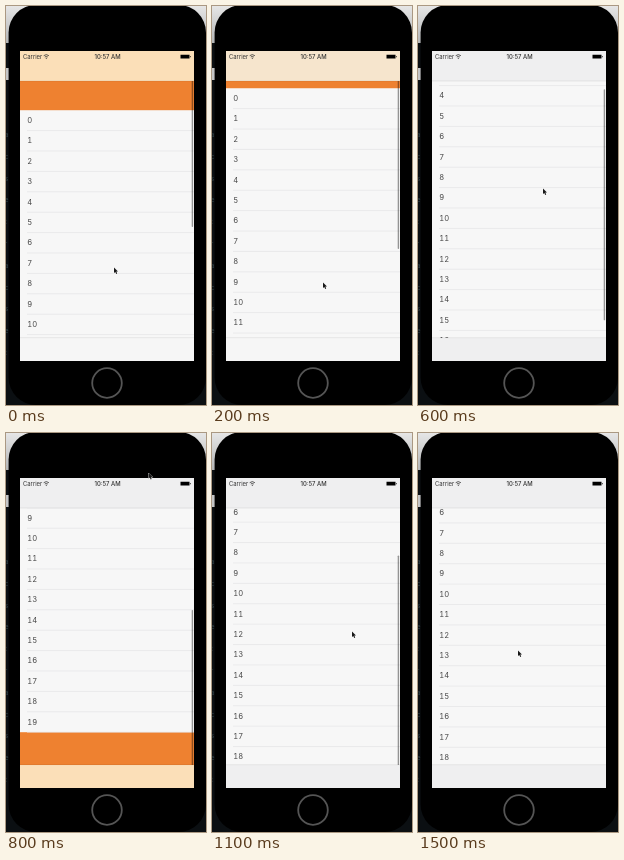
These frames come from a looping animation (200 px wide and 399 px high, 1.9 s). An HTML page:

```html
<!DOCTYPE html>
<html lang="en">
<head>
<meta charset="utf-8">
<style>
html, body { margin: 0; width: 100%; height: 100%; overflow: hidden; background: #0b0f12; }
svg { display: block; width: 200px; height: 399px; }
text { font-family: Inter, Roboto, sans-serif; }
#rows text { font-size: 7.6px; fill: #484848; font-variant-numeric: tabular-nums; }
#rows path { stroke: #e4e4e6; stroke-width: .7; }
.status { font-size: 5.9px; fill: #333; }
.code { font: 6px "Noto Sans Mono", monospace; fill: #34454a; }
</style>
</head>
<body>
<svg viewBox="0 0 200 399">
  <defs>
    <clipPath id="list"><rect x="14" y="75" width="174" height="257"/></clipPath>
    <linearGradient id="desk" x2="0" y2="1">
      <stop stop-color="#e6e6e6"/><stop offset="1" stop-color="#b4b6b7"/>
    </linearGradient>
  </defs>

  <rect width="200" height="37" fill="url(#desk)"/>
  <rect y="62" width="3" height="12" fill="#c4c5c6"/>
  <g id="code" class="code"></g>
  <rect x="2.6" y="-1" width="197.4" height="400" rx="27.5"/>
  <circle cx="101" cy="377" r="14.8" fill="none" stroke="#555" stroke-width="1.8"/>

  <g clip-path="url(#list)">
    <rect x="14" y="75" width="174" height="257" fill="#ee8130"/>
    <g id="rows"><rect x="14" width="174" height="408" fill="#f7f7f7"/></g>
    <rect id="bar" x="185.7" width="1.4" height="231" rx=".7" fill-opacity=".4"/>
  </g>

  <rect x="14" y="45" width="174" height="30" fill="#efeff0"/>
  <rect id="topTint" x="14" y="45" width="174" height="30" fill="#fbdfb8"/>
  <rect x="14" y="332" width="174" height="23" fill="#efeff0"/>
  <rect id="bottomLight" x="14" y="332" width="174" height="23" fill="#f6f6f6"/>
  <rect id="bottomTint" x="14" y="332" width="174" height="23" fill="#fbdfb8"/>
  <path d="M14 75h174M14 331.7h174" stroke="#000" stroke-opacity=".12" stroke-width=".6"/>

  <text class="status" x="17" y="52.7">Carrier</text>
  <g fill="none" stroke="#333" stroke-width=".8">
    <path d="M37.7 49.7q2.6-2.2 5.2 0M38.8 51q1.5-1.2 3 0"/>
    <circle cx="40.3" cy="52.2" r=".3"/>
  </g>
  <text class="status" x="101.5" y="52.7" text-anchor="middle" font-weight="500">10:57 AM</text>
  <path d="M174.5 48.8h9v3.6h-9zM184 49.9h.6v1.4h-.6z"/>

  <path id="cursor" d="M0 .6v5.4l1.3-1.1.9 2 1-.4-.9-1.9h1.7z" fill="#181818" stroke="#fff" stroke-width=".7" paint-order="stroke"/>
</svg>
<script>
const ROW = 20.4, LIST_TOP = 75.2, LOOP = 1900, STEP = 100, END = 1500;
const PEAK = 184, REST = 128.1;
const $ = id => document.getElementById(id);
const set = (id, name, value) => $(id).setAttribute(name, value);
const clamp = v => Math.max(0, Math.min(1, v));
const mix = (a, b, p) => a + (b - a) * p;

// Turning points of the pointer: time, x, y
const path = [
  [0, 108, 261], [200, 111, 276], [600, 125, 182], [800, 142.5, 39.5],
  [1100, 140, 198], [1400, 93, 222], [END, 100, 217]
];

function pointer(t) {
  const i = Math.max(1, path.findIndex(point => point[0] >= t));
  const [t0, x0, y0] = path[i - 1], [t1, x1, y1] = path[i];
  const p = (t - t0) / (t1 - t0);
  return [mix(x0, x1, p), mix(y0, y1, p ** 1.7)];
}

// An accelerating drag, a fling past the end, then a damped spring back.
function scrollAt(t) {
  const drag = u => -29 + 7.62 * u + 1.68 * u * u;
  if (t <= 600) return drag(t / 100);
  if (t <= 800) return mix(drag(6), PEAK, (t - 600) / 200);
  const w = (t - 800) * .021;
  return REST + (PEAK - REST) * (1 + w) * Math.exp(-w);
}

let rows = "", code = "";
for (let n = 0; n < 20; n++) {
  rows += `<text x="21.3" y="${n * ROW + 12.8}">${n}</text><path d="M21 ${(n + 1) * ROW}h167"/>`;
}
for (let n = 0; n < 11; n++) {
  code += `<text x="-1" y="${131 + n * 21.8}">${"acsetr"[n % 6]}</text>`;
}
$("rows").insertAdjacentHTML("beforeend", rows);
$("code").innerHTML = code;

function draw(now) {
  const t = Math.floor(Math.min(now % LOOP, END) / STEP) * STEP;
  const scroll = scrollAt(t), [x, y] = pointer(t);
  // The bar scales with the content, then moves one to one past either end.
  const barTop = Math.max(scroll - 7, Math.min(scroll + 19, 24.9 + .757 * scroll));
  set("rows", "transform", `translate(0 ${LIST_TOP - scroll})`);
  set("bar", "y", barTop);
  set("bar", "opacity", clamp((1450 - t) / 250));
  set("topTint", "opacity", clamp((29 - scroll) / 58));
  set("bottomLight", "opacity", clamp((28 - scroll) / 28));
  set("bottomTint", "opacity", clamp((scroll - 129) / 46));
  set("cursor", "transform", `translate(${x} ${y})`);
}

const start = performance.now();
function tick() {
  draw(performance.now() - start);
  requestAnimationFrame(tick);
}
tick();
</script>
</body>
</html>
```
